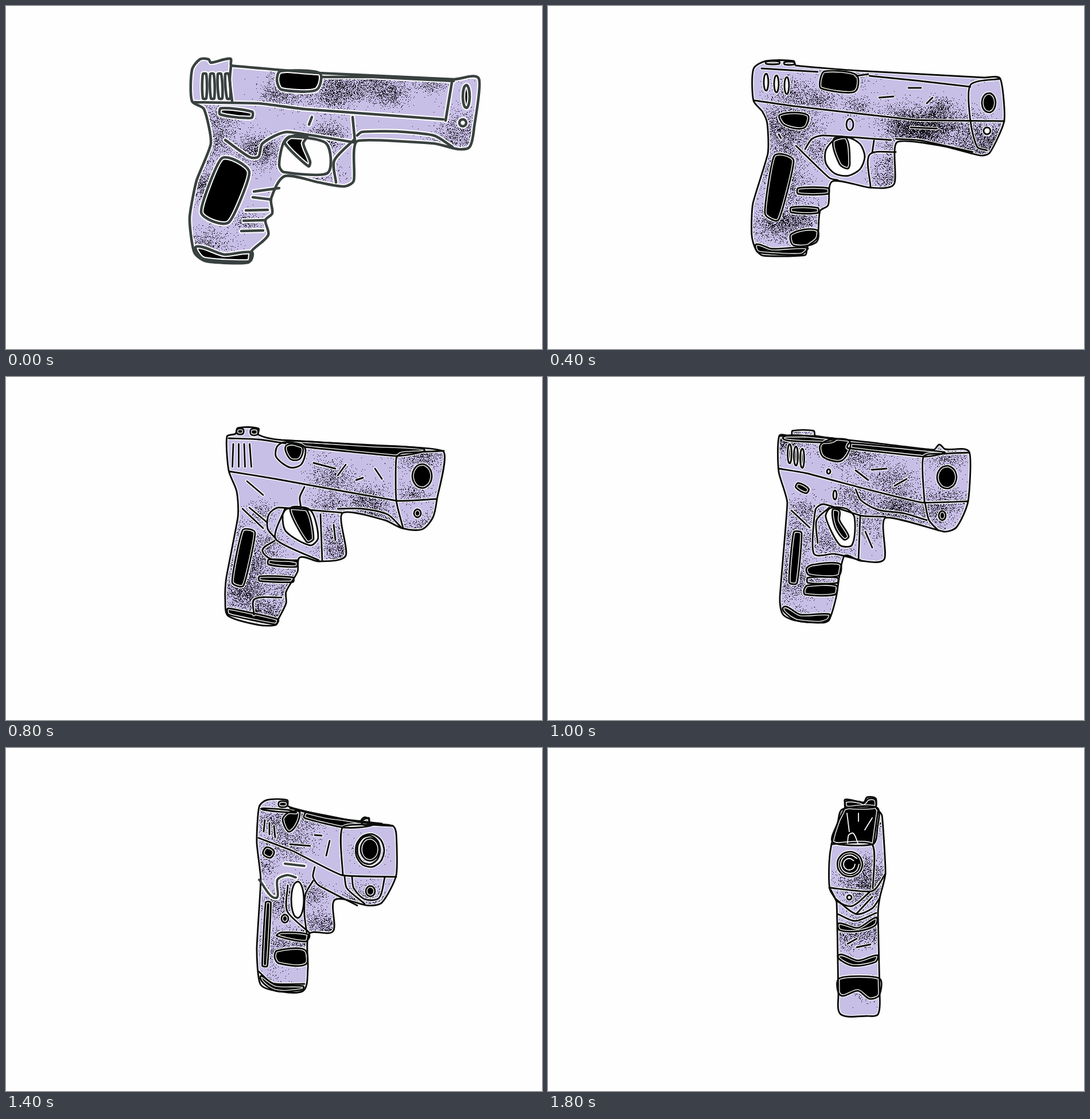
An HTML page with a canvas for the animation above (2 s loop, 934 by 599 pixels).

```html
<!DOCTYPE html>
<html lang="en">
<head>
<meta charset="utf-8">
<title>Turning sketch</title>
<style>
html, body { margin: 0; width: 100%; height: 100%; overflow: hidden; background: #fefefe; }
canvas { display: block; }
</style>
</head>
<body>
<canvas id="stage" width="934" height="599"></canvas>
<script>
const W = 934, H = 599, STEP = 200, PAPER = '#fefefe', LILAC = '#c8bfe7';
const THIN = { ink: '#090c09', width: 2.9, halo: 5.6 };
const SOFT = { ink: '#394140', width: 4.6, halo: 8.6 };
let layers, warp, outline;

const parse = text => text.split(' ').map(pair => {
  const [x, y] = pair.split(',').map(Number);
  return [warp(x), y];
});

// Path through the points whose bends are rounded by short tangents.
function curve(points, closed) {
  const path = new Path2D(), n = points.length;
  const at = i => points[closed ? (i + n) % n : Math.max(0, Math.min(n - 1, i))];
  const pull = (from, to, reach) => {
    const dx = to[0] - from[0], dy = to[1] - from[1], k = reach / (Math.hypot(dx, dy) || 1);
    return [dx * k, dy * k];
  };
  path.moveTo(...at(0));
  for (let i = 0; i < (closed ? n : n - 1); i++) {
    const a = at(i - 1), b = at(i), c = at(i + 1), d = at(i + 2);
    const reach = Math.min(12, 0.27 * Math.hypot(c[0] - b[0], c[1] - b[1]));
    const u = pull(a, c, reach), v = pull(b, d, reach);
    path.bezierCurveTo(b[0] + u[0], b[1] + u[1], c[0] - v[0], c[1] - v[1], ...c);
  }
  if (closed) path.closePath();
  return path;
}

const pen = (layer, closed) => (...shapes) =>
  shapes.forEach(s => layers[layer].push(curve(parse(s), closed)));
const hole = pen('hole', true), dark = pen('dark', true), loop = pen('loop', true);
const line = pen('line', false), grey = pen('grey', false), pale = pen('pale', false);

function body(shape) {
  outline = parse(shape);
  layers.body.push(curve(outline, true));
}

function oval(x, y, rx, ry = rx) {
  return Array.from({ length: 9 }, (_, i) => {
    const a = i * 2 * Math.PI / 9;
    return `${x + rx * Math.cos(a)},${y + ry * Math.sin(a)}`;
  }).join(' ');
}

// Bar of the given thickness around a centre line.
function slab(x1, y1, x2, y2, thick) {
  const k = thick / 2 / Math.hypot(x2 - x1, y2 - y1), nx = (y1 - y2) * k, ny = (x2 - x1) * k;
  return `${x1 + nx},${y1 + ny} ${x2 + nx},${y2 + ny} ${x2 - nx},${y2 - ny} ${x1 - nx},${y1 - ny}`;
}

function tick(x, y, dx, dy) {
  line(`${x},${y} ${x + dx},${y + dy}`);
}

function side() {
  body('324,112 338,93 353,93 357,99 391,92 393,104 546,117 780,128 824,127 816,210 808,246 788,250 745,240 612,236 606,305 590,315 545,308 486,297 462,336 464,362 452,374 457,400 428,428 422,448 350,446 328,430 320,370 332,305 357,240 345,180 324,166');
  hole('483,240 476,278 484,290 560,292 558,240 495,228', oval(796, 204, 6));
  for (let i = 0; i < 4; i++) hole(slab(346 + i * 13, 119, 346 + i * 14, 161, 6));
  dark('486,240 496,228 524,227 518,240 530,272 527,280', slab(374, 184, 428, 190, 11), '472,130 478,114 546,117 540,147 480,146');
  dark('376,266 424,290 388,378 340,360', oval(802, 158, 6, 20), '332,420 380,434 428,430 424,446 345,442');
  line('326,168 440,170 520,180 762,198', '552,124 640,124 780,131', '777,133 766,200', '392,105 390,130 394,166', '604,194 608,236');
  line('612,226 620,220 680,219 745,226 778,246', '575,308 572,270 606,234', '382,234 425,264 440,263 447,240 490,220 606,238');
  tick(533, 194, -5, 13);
  tick(432, 324, 44, -6);
  tick(430, 334, 32, 4);
  for (let i = 0; i < 3; i++) tick(418 - i * 4, 357 + i * 18, 38, -1);
}

function slightTurn() {
  body('340,107 360,107 360,93 377,93 392,102 410,94 411,107 480,108 540,113 740,120 811,124 812,196 798,212 784,250 765,254 612,238 607,312 570,318 490,300 476,358 460,374 452,420 434,432 426,452 385,451 342,434 335,350 343,305 369,225 364,207 343,194');
  hole('473,245 482,231 552,236 562,262 550,296 490,285', slab(430, 329, 476, 326, 10), slab(424, 366, 472, 356, 8), slab(416, 386, 456, 384, 7));
  for (let i = 0; i < 3; i++) hole(oval(360 + i * 18, 139 - i, 4, 16));
  dark('485,236 492,228 520,228 534,270 528,284', slab(382, 187, 443, 198, 15), '474,132 482,116 536,118 535,148 480,148');
  dark('380,259 424,272 418,320 388,395 355,355', oval(788, 165, 7, 13), '343,416 390,430 432,434 428,446 388,448 342,432');
  loop(oval(788, 164, 12, 18), oval(785, 217, 6, 5), oval(525, 207, 5, 11));
  line('343,167 430,172 640,196 765,211', '810,124 762,130 768,208 812,202', '765,212 764,235 772,253', '612,220 640,226 752,238');
  line('488,293 443,290 443,265 452,242 470,223 555,230 622,229', '606,240 578,242 566,316', '340,410 390,428 434,432');
  tick(582, 148, 46, 5);
  tick(687, 178, 35, -23);
  tick(386, 222, 21, 26);
  line('422,238 440,250 462,257', '799,212 797,224');
}

function quarterNear() {
  body('358,110 380,96 428,96 432,104 540,113 760,125 788,127 795,200 770,256 753,261 690,245 608,238 603,311 560,317 496,306 488,348 474,358 469,405 452,420 448,435 375,436 362,425 355,400 357,345 383,258 382,205 374,185 358,165');
  hole(oval(517, 263, 35, 34), oval(765, 218, 6));
  for (let i = 0; i < 3; i++) hole(oval(380 + i * 18, 133 + i * 3, 4, 15));
  dark('497,234 520,231 526,275 522,284 508,276', slab(436, 323, 488, 323, 10), slab(424, 356, 470, 357, 9), '424,398 468,391 467,413 428,418');
  dark('404,190 452,190 446,213 412,208', '474,130 482,114 537,120 534,150 476,144', '394,262 428,270 402,373 378,362', oval(768, 169, 12, 17));
  dark('363,416 390,424 452,422 440,434 366,430', slab(380, 99, 403, 99, 4), slab(412, 100, 429, 100, 4));
  loop(oval(526, 207, 6, 10));
  line('360,165 430,175 640,199 795,201', '372,109 470,115', '537,122 558,119', '560,122 640,130 736,141', '788,127 736,138 736,200 748,246 765,252');
  line('606,232 650,235 740,255', '448,250 460,232 480,226 598,234', '432,244 490,300 505,304', '606,255 560,260 562,316', '568,235 565,256');
  tick(577, 160, 25, -2);
  tick(628, 143, 22, 0);
  tick(660, 170, 10, -10);
  tick(632, 212, 46, 2);
  tick(402, 224, 4, 7);
}

function quarterFar() {
  body('385,104 400,99 404,89 440,90 440,101 480,110 640,119 762,130 751,213 744,245 725,266 690,264 660,250 586,238 592,312 545,322 512,315 508,340 488,375 488,395 474,424 470,433 440,433 387,417 382,390 384,350 404,245 402,200 388,163');
  hole('482,242 490,230 530,232 544,280 530,294 488,270');
  dark('495,231 524,232 536,282 524,288', '490,111 640,120 728,126 680,138 520,122', '488,120 516,122 512,143 495,143', slab(458, 323, 506, 327, 9), slab(442, 352, 500, 354, 8));
  dark('412,268 434,272 414,364 394,358', oval(725, 173, 17, 21), oval(717, 238, 6, 7), '387,404 474,423 470,432 388,415', slab(403, 95, 413, 95, 8), slab(427, 96, 438, 96, 9));
  loop('471,140 472,122 485,114 520,122 515,152 495,158');
  line('388,107 440,109 487,116', '390,165 470,178 680,216 751,213', '763,129 690,133 680,142 680,215 692,264', '578,230 620,230 665,240 688,262', '520,192 512,210 514,228');
  line('470,282 456,265 458,240 475,228 585,237', '486,230 470,283 545,320', '468,286 447,302 462,318 508,320', '548,240 551,320', '432,415 433,388 480,385');
  for (let i = 0; i < 4; i++) tick(396 + i * 9.5, 117, 3 * (i - 1) / 2, 40);
  tick(536, 150, 38, 10);
  tick(592, 153, -14, 19);
  tick(610, 180, 12, -4);
  tick(643, 160, 12, 18);
  tick(571, 258, 3, 27);
  tick(420, 182, 28, 24);
  tick(412, 230, 36, 34);
  tick(424, 228, 31, 26);
}

function halfTurn() {
  body('403,103 424,102 426,94 463,94 466,103 560,114 672,127 682,118 692,126 734,131 732,217 712,262 690,270 588,246 586,318 545,321 516,313 502,385 490,424 480,429 430,425 409,414 404,385 417,220 402,165');
  hole('484,245 492,229 520,230 534,245 530,293 508,293');
  dark('410,105 480,106 500,110 472,114', '526,115 690,131 655,139 522,124', '474,120 490,110 526,113 512,146 480,140', '496,232 508,234 508,250 524,278 516,284 500,262');
  dark('450,335 460,328 508,326 506,347 455,346', '446,372 452,364 502,364 500,380 448,380', oval(695, 175, 17, 20), oval(687, 242, 6, 8), slab(435, 272, 427, 359, 14), '410,402 440,415 490,414 488,424 470,429 430,424');
  for (let i = 0; i < 3; i++) dark(oval(421 + i * 11, 134 + i * 4, 3.5, 17));
  dark(slab(434, 189, 452, 199, 9));
  loop(slab(453, 355, 504, 355, 9), oval(489, 165, 3, 4), oval(500, 206, 3, 8));
  line('402,160 450,168 540,192 650,219 732,217', '734,132 690,134 654,140 656,218', '657,220 664,250 680,268', '536,196 545,215 575,232 620,238 660,250', '403,103 466,103 500,110');
  line('545,320 500,309 463,308 466,232 480,222 545,242 588,244', '544,244 541,320', '470,290 468,250 490,228');
  tick(536, 163, 22, 17);
  tick(564, 162, 26, -2);
  tick(604, 190, 21, -12);
  tick(424, 233, 32, 30);
  tick(553, 270, 12, 28);
}

function nearFront() {
  body('441,103 454,91 490,91 492,102 560,119 615,128 632,122 634,131 674,136 680,150 680,222 655,270 630,275 573,265 570,320 528,325 526,385 518,424 470,424 443,412 437,350 444,230 437,165');
  hole(oval(508, 265, 11, 32));
  dark('524,112 612,129 640,134 590,139 520,122', slab(476, 98, 489, 98, 8), '482,125 492,113 512,113 495,146', '446,107 490,108 505,113', oval(626, 128, 7));
  dark(oval(634, 177, 16, 20), oval(635, 250, 8, 9), oval(486, 298, 6, 7), '472,328 480,322 528,326 522,338', '468,365 472,354 520,352 522,378 475,376', slab(457, 270, 451, 380, 9), slab(451, 179, 464, 186, 13), '443,400 470,414 518,416 517,422 470,424');
  loop(oval(634, 179, 25, 29), oval(632, 178, 20, 25));
  line('495,105 560,121 655,132', '440,157 500,180 585,222 680,225', '674,136 587,138 587,222', '590,225 594,245 625,272', '603,226 606,245 625,264 650,262 660,226');
  line('538,208 535,225 545,240 612,275', '524,322 520,290 522,255 535,232', '491,240 490,285 528,322', '440,390 465,411 520,412');
  for (let i = 0; i < 3; i++) tick(451 + i * 8, 126 + i * 5, 2 * i - 2, 20);
  tick(538, 152, 12, 1);
  tick(495, 168, 35, 3);
  tick(564, 162, -6, 26);
  grey('441,230 470,262 473,230 490,222 505,226', '486,202 520,206');
}

function front() {
  body('518,102 518,90 550,95 556,86 571,88 572,104 582,118 588,218 578,262 575,290 578,430 575,465 555,468 510,465 506,430 503,270 491,246 490,200 494,168 505,130');
  hole(oval(525, 261, 4));
  dark('513,107 573,104 574,140 566,168 497,165 505,130', '519,93 544,94 550,97 558,89 570,90 570,103 519,103', oval(526, 203, 22));
  dark('507,306 540,314 572,296 570,310 540,320 508,318', '506,362 540,371 574,362 570,374 530,380', '508,402 577,402 577,432 560,438 540,424 510,432');
  line('495,168 565,169 566,245', '490,244 564,250 588,220', '493,248 505,268 530,276 560,252', '503,265 537,290 565,280 578,262', '537,290 565,260', '567,168 575,110', '505,290 535,302 572,288');
  tick(522, 342, 16, -9);
  tick(538, 348, 24, -5);
  pale('521,114 525,146', '541,114 541,128', '565,122 552,143', '522,166 524,152 532,149 540,166', oval(526, 203, 16), oval(525, 203, 10));
}

// Piecewise linear remap of x, used for the in-between poses.
const remap = (from, to) => x => {
  let i = 1;
  while (i < from.length - 1 && x > from[i]) i++;
  return to[i - 1] + (x - from[i - 1]) / (from[i] - from[i - 1]) * (to[i] - to[i - 1]);
};

const poses = [
  [side, SOFT], [slightTurn, SOFT], [quarterNear, THIN],
  [quarterFar, THIN, remap([383, 515, 680, 762], [370, 513, 708, 776])],
  [quarterFar, THIN], [halfTurn, THIN],
  [halfTurn, THIN, remap([402, 505, 655, 735], [419, 513, 620, 704])],
  [nearFront, THIN],
  [nearFront, THIN, remap([437, 525, 587, 681], [451, 539, 567, 655])],
  [front, THIN]
];

function seeded(seed) {
  return () => (seed = (seed * 16807) % 2147483647) / 2147483647;
}

// Black spray: soft round clouds of single dots, kept inside the body.
function speckle(ctx, random) {
  const xs = outline.map(p => p[0]), ys = outline.map(p => p[1]);
  const left = Math.min(...xs), top = Math.min(...ys);
  const w = Math.max(...xs) - left, h = Math.max(...ys) - top;
  ctx.save();
  ctx.clip(layers.body[0]);
  ctx.fillStyle = '#000';
  for (let n = w * h / 3800; n > 0; n--) {
    const x = left + w * random(), y = top + h * random(), r = 22 + 20 * random();
    for (let i = r * r * 0.55; i > 0; i--) {
      const d = r * 0.5 * Math.sqrt(-2 * Math.log(random())), a = random() * 2 * Math.PI;
      ctx.fillRect(Math.round(x + 1.2 * d * Math.cos(a)), Math.round(y + 0.85 * d * Math.sin(a)), 1, 1);
    }
  }
  ctx.restore();
}

function render([draw, style, shift = x => x], index) {
  const sheet = document.createElement('canvas');
  sheet.width = W;
  sheet.height = H;
  const ctx = sheet.getContext('2d');
  const fill = (paths, color) => {
    ctx.fillStyle = color;
    paths.forEach(p => ctx.fill(p));
  };
  const stroke = (paths, color, width) => {
    ctx.strokeStyle = color;
    ctx.lineWidth = width;
    paths.forEach(p => ctx.stroke(p));
  };
  layers = { body: [], hole: [], dark: [], loop: [], line: [], grey: [], pale: [] };
  warp = shift;
  draw();
  ctx.lineCap = ctx.lineJoin = 'round';
  ctx.fillStyle = PAPER;
  ctx.fillRect(0, 0, W, H);
  fill(layers.body, LILAC);
  speckle(ctx, seeded(7100 + index * 97711));
  fill(layers.hole, PAPER);
  fill(layers.dark, '#000');
  const edges = ['body', 'hole', 'dark', 'loop', 'line'].flatMap(name => layers[name]);
  stroke(edges, PAPER, style.halo);
  stroke(layers.grey, PAPER, SOFT.halo);
  stroke(edges, style.ink, style.width);
  stroke(layers.grey, SOFT.ink, 4);
  stroke(layers.pale, PAPER, 1.8);
  return sheet;
}

const sheets = poses.map(render);
const stage = document.getElementById('stage').getContext('2d');
const start = performance.now();
function play() {
  const time = performance.now() - start;
  stage.drawImage(sheets[Math.floor(time / STEP) % sheets.length], 0, 0);
  requestAnimationFrame(play);
}
play();
</script>
</body>
</html>
```
